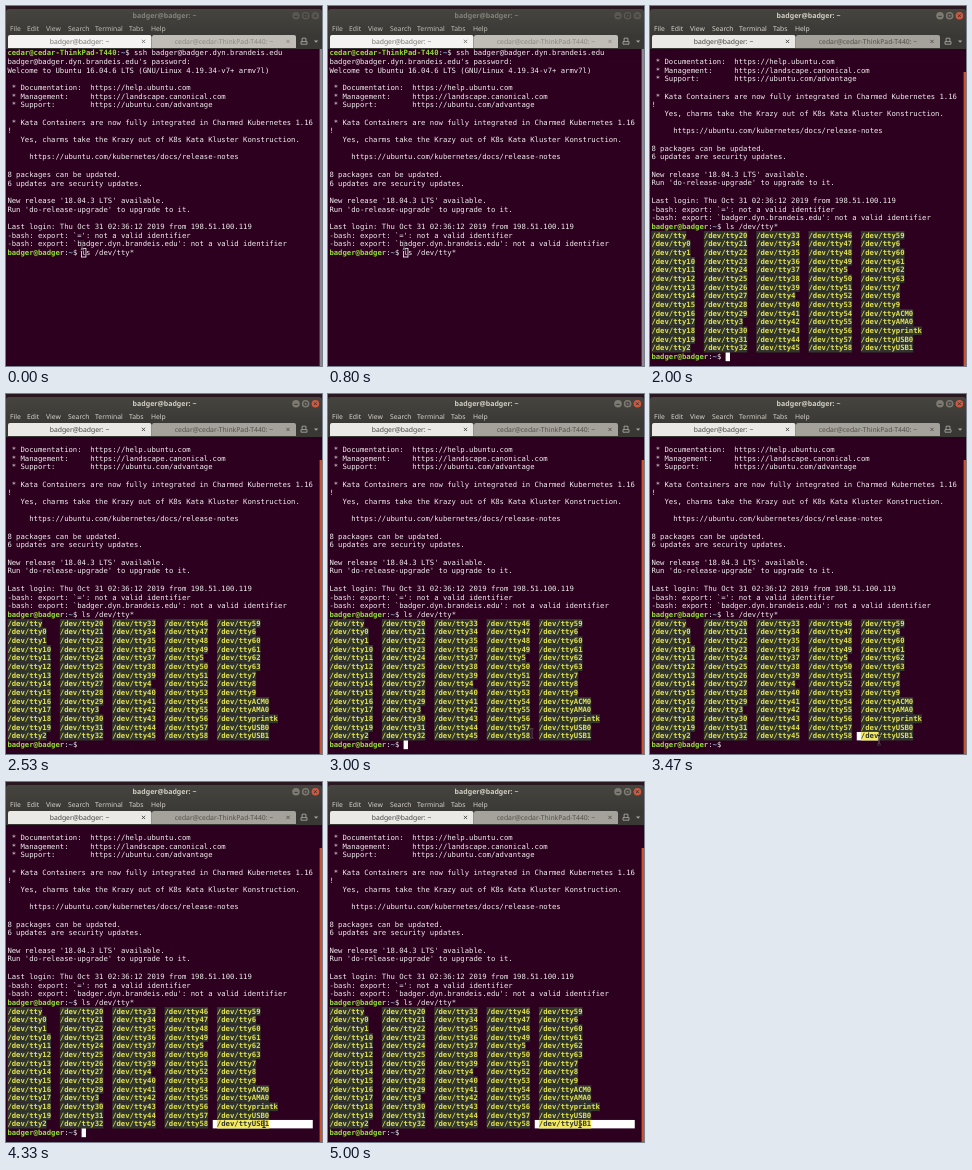
These frames come from a looping animation (316 by 360 pixels, 5.07 s). An HTML page:

```html
<!DOCTYPE html>
<html lang="en">
<head>
<meta charset="utf-8">
<title>Terminal</title>
<style>
  html, body { margin: 0; width: 100%; height: 100%; overflow: hidden; background: #2c001e; }
  svg { display: block; width: 316px; height: 360px; }
  text { white-space: pre; text-rendering: geometricPrecision; }
  .ui { font-family: "Noto Sans", "Open Sans", sans-serif; font-size: 6.8px; }
  .term { font-family: "DejaVu Sans Mono", "Liberation Mono", monospace; font-size: 7.25px; fill: #f0ecee; }
  .user { font-weight: bold; fill: #95dc3a; }
  .path { font-weight: bold; fill: #8fabd0; }
  .dev { font-weight: bold; fill: #e2e052; }
</style>
</head>
<body>
<svg id="stage" viewBox="0 0 316 360" xmlns="http://www.w3.org/2000/svg">
  <defs>
    <linearGradient id="barFill" x2="0" y2="1">
      <stop offset="0" stop-color="#46443f"/><stop offset="1" stop-color="#3a3935"/>
    </linearGradient>
    <clipPath id="view"><rect y="43" width="313" height="317"/></clipPath>
    <clipPath id="selClip"><rect id="selBox" height="9"/></clipPath>
  </defs>
  <rect width="316" height="360" fill="#2c001e"/>
  <rect width="316" height="5" fill="#2a1820"/>
  <path d="M0 29V6q0-3 3-3H313q3 0 3 3V29Z" fill="url(#barFill)"/>
  <g id="chrome" class="ui"></g>
  <g clip-path="url(#view)"><g id="screen" class="term"></g></g>
  <rect id="thumb" x="313.6" width="2.4"/>
  <g id="pointer" fill="none">
    <path d="M-1.6-4.5H1.6M0-4.5V4.5M-1.6 4.5H1.6" stroke="#bbb" stroke-opacity=".6" stroke-width="1.5"/>
    <path d="M-1.6-4.5H1.6M0-4.5V4.5M-1.6 4.5H1.6" stroke="#1c1018" stroke-width=".9"/>
  </g>
</svg>
<script>
const LOOP = 5070, FOCUS = 870, RUN = 1600, SHOW = 2600, DRAG = 3200;
const CW = 4.364, LH = 8.68, X0 = 1.4, Y0 = 42.7;
const USER = 'badger', PEER = 'cedar';
const HOST = USER + '.dyn.brandeis.edu';
const $ = id => document.getElementById(id);
const colX = c => X0 + c * CW;
const rowY = r => Y0 + r * LH;

function add(parent, tag, attrs, text) {
  const el = document.createElementNS('http://www.w3.org/2000/svg', tag);
  for (const k in attrs) el.setAttribute(k, attrs[k]);
  if (text !== undefined) el.textContent = text;
  parent.appendChild(el);
  return el;
}
const cell = (parent, col, row, n, attrs) =>
  add(parent, 'rect', { x: colX(col), y: rowY(row), width: n * CW, height: LH, ...attrs });
const write = (parent, col, row, text, attrs) =>
  add(parent, 'text', { x: colX(col), y: rowY(row) + 6.6, ...attrs }, text);

function prompt(parent, row, who, cmd) {
  const line = write(parent, 0, row, '');
  [['user', who], ['', ':'], ['path', '~'], ['', '$ ' + cmd]]
    .forEach(([c, s]) => add(line, 'tspan', { class: c }, s));
}

// Window frame
const chrome = $('chrome');
const title = add(chrome, 'text', { x: 158.5, y: 12.2, 'text-anchor': 'middle', 'font-weight': 600, 'font-size': 7 },
  `${USER}@${USER}: ~`);
const menu = [[4, 'File'], [21, 'Edit'], [40, 'View'], [62, 'Search'], [89, 'Terminal'], [123, 'Tabs'], [145, 'Help']]
  .map(([x, s]) => add(chrome, 'text', { x, y: 24.6 }, s));
const buttons = [290, 299.6, 309.4].map(cx => add(chrome, 'circle', { cx, cy: 9.7, r: 3.8 }));
add(chrome, 'path', { d: 'M288.4 10.4h3.2M298.1 8.2h3v3h-3zM308 8.3l2.8 2.8m0-2.8l-2.8 2.8',
  stroke: '#35332f', 'stroke-width': .9, fill: 'none' });

add(chrome, 'rect', { y: 28, width: 316, height: 15, fill: '#3a3834' });
function tab(x, w, mid, label) {
  const face = add(chrome, 'path', { d: `M${x} 42V31q0-2 2-2h${w - 4}q2 0 2 2V42Z` });
  const text = add(chrome, 'text', { x: mid, y: 37.5, 'text-anchor': 'middle' }, label);
  const cx = x + w - 8;
  const close = add(chrome, 'path', { d: `M${cx - 1.6} 33.8l3.2 3.2m0-3.2l-3.2 3.2`, 'stroke-width': .9 });
  return (fill, ink) => {
    face.setAttribute('fill', fill);
    text.setAttribute('fill', ink);
    close.setAttribute('stroke', ink);
  };
}
const paintActive = tab(2, 143.5, 73.5, `${USER}@${USER}: ~`);
const paintOther = tab(146, 144, 218, `${PEER}@${PEER}-ThinkPad-T440: ~`);
add(chrome, 'path', { d: 'M295 38.2h6v-2.6h-6zM296.1 35.4v-3.2h3.8v3.2', fill: 'none', stroke: '#a8a59e', 'stroke-width': .9 });
add(chrome, 'path', { d: 'M308 34.4h4.2l-2.1 2.4z', fill: '#a8a59e' });

// Login session
const screen = $('screen');
prompt(screen, 0, `${PEER}@${PEER}-ThinkPad-T440`, `ssh ${USER}@${HOST}`);
[
  `${USER}@${HOST}'s password:`,
  'Welcome to Ubuntu 16.04.6 LTS (GNU/Linux 4.19.34-v7+ armv7l)',
  '',
  ' * Documentation:  https://help.ubuntu.com',
  ' * Management:     https://landscape.canonical.com',
  ' * Support:        https://ubuntu.com/advantage',
  '',
  ' * Kata Containers are now fully integrated in Charmed Kubernetes 1.16',
  '!',
  '   Yes, charms take the Krazy out of K8s Kata Kluster Konstruction.',
  '',
  '     https://ubuntu.com/kubernetes/docs/release-notes',
  '',
  '8 packages can be updated.',
  '6 updates are security updates.',
  '',
  "New release '18.04.3 LTS' available.",
  "Run 'do-release-upgrade' to upgrade to it.",
  '',
  'Last login: Thu Oct 31 02:36:12 2019 from 198.51.100.119',
  "-bash: export: `=': not a valid identifier",
  "-bash: export: `" + HOST + "': not a valid identifier"
].forEach((s, i) => s && write(screen, 0, i + 1, s));
prompt(screen, 23, `${USER}@${USER}`, 'ls /dev/tty*');

// Device listing: 14 rows, filled column by column
const listing = add(screen, 'g', {});
const ttys = ['', ...Array.from({ length: 64 }, (_, i) => String(i)).sort(),
  'ACM0', 'AMA0', 'printk', 'USB0', 'USB1'].map(s => '/dev/tty' + s);
ttys.forEach((s, i) => {
  const col = 12 * Math.floor(i / 14), row = 24 + i % 14;
  cell(listing, col, row, s.length, { fill: '#30362e' });
  write(listing, col, row, s, { class: 'dev' });
});
prompt(listing, 38, `${USER}@${USER}`, '');

// Selection over the last entry
const SEL_ROW = 37, SEL_COL = 47, TEXT_COL = 48, TEXT_END = 60, LAST_COL = 70;
const sel = add(screen, 'g', { 'clip-path': 'url(#selClip)' });
cell(sel, SEL_COL, SEL_ROW, LAST_COL - SEL_COL, { fill: '#fff' });
cell(sel, TEXT_COL, SEL_ROW, 12, { fill: '#f4ea62' });
write(sel, TEXT_COL, SEL_ROW, '/dev/ttyUSB1', { fill: '#34382e', 'font-weight': 'bold' });
$('selBox').setAttribute('x', colX(SEL_COL));
$('selBox').setAttribute('y', rowY(SEL_ROW));

const hollow = cell(screen, 17, 23, 1, { fill: 'none', stroke: '#fff', 'stroke-width': .8 });
const block = add(screen, 'g', {});
cell(block, 17, 23, 1, { fill: '#fff' });
write(block, 17, 23, 'l', { fill: '#2c001e' });
const caret = cell(screen, 17, 38, 1, { fill: '#fff' });

// Pointer: time, x, y
const path = [[0, 76, 240], [SHOW, 76, 240], [3050, 208, 343], [DRAG, 208, 343], [3470, 229, 346],
  [3800, 276, 344], [4000, 276, 343], [4330, 258, 341], [5000, 252, 341], [LOOP, 252, 341]];
function pointerAt(t) {
  const i = Math.max(1, path.findIndex(p => p[0] >= t));
  const [t0, xa, ya] = path[i - 1], [t1, xb, yb] = path[i];
  const k = (t - t0) / (t1 - t0), e = k * k * (3 - 2 * k);
  return [xa + (xb - xa) * e, ya + (yb - ya) * e];
}
const show = (el, on) => el.setAttribute('visibility', on ? 'visible' : 'hidden');

function render(t) {
  const focus = t >= FOCUS, ran = t >= RUN;
  title.setAttribute('fill', focus ? '#d2cec3' : '#85827b');
  menu.forEach(m => m.setAttribute('fill', focus ? '#d6d3cb' : '#c2bfb7'));
  buttons.forEach((b, i) => b.setAttribute('fill', !focus ? '#5a5751' : i === 2 ? '#d8553a' : '#7d7a72'));
  paintActive(focus ? '#ebe9e6' : '#f4f3f1', focus ? '#45433f' : '#77746e');
  paintOther(focus ? '#a5a19b' : '#c0bdb7', focus ? '#54514c' : '#8c8983');

  screen.setAttribute('transform', `translate(0 ${ran ? -3 * LH : 0})`);
  show(listing, ran);
  show(hollow, !focus);
  show(block, focus && !ran);
  show(caret, ran && (t - RUN) % 1200 < 600);

  const top = ran ? 66 : 43, thumb = $('thumb');
  thumb.setAttribute('y', top);
  thumb.setAttribute('height', 360 - top);
  thumb.setAttribute('fill', focus ? '#c9552f' : '#8d868a');

  const [x, y] = pointerAt(t);
  show($('pointer'), !ran || t >= SHOW);
  $('pointer').setAttribute('transform', `translate(${x} ${y})`);

  const col = t >= 3800 ? LAST_COL : Math.floor((x - X0) / CW + .05);
  const end = col > TEXT_END ? LAST_COL : col;
  show(sel, t >= DRAG && end > SEL_COL);
  $('selBox').setAttribute('width', Math.max(0, end - SEL_COL) * CW);
}

const start = performance.now();
function tick() {
  render((performance.now() - start) % LOOP);
  requestAnimationFrame(tick);
}
render(0);
requestAnimationFrame(tick);
</script>
</body>
</html>
```
